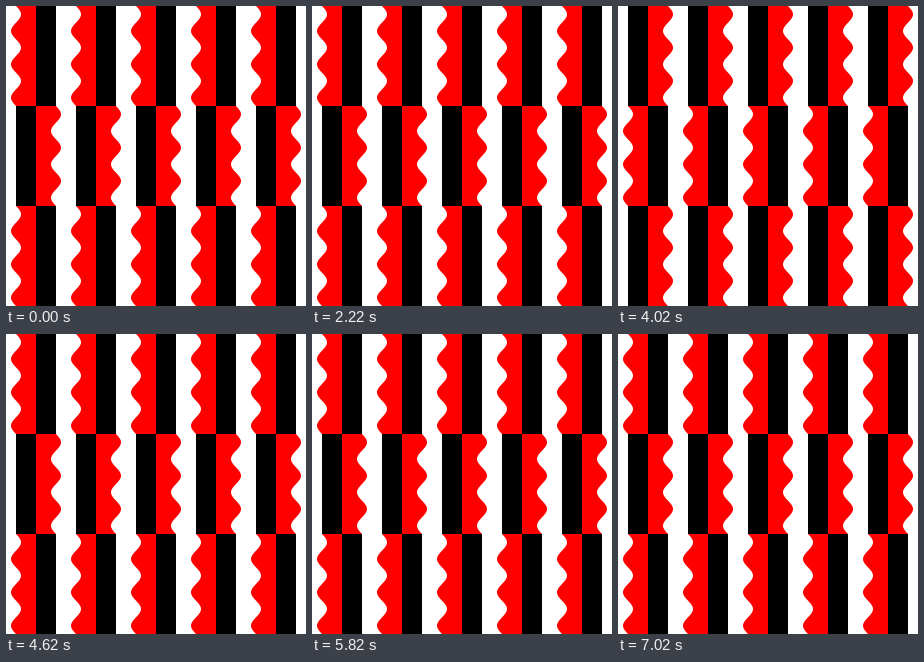
These frames come from a looping animation (300 px wide and 300 px high, 7.2 s). An HTML page:

```html
<!DOCTYPE html>
<html lang="en">
<head>
<meta charset="utf-8">
<title>Wavy bars</title>
<style>
  html, body { margin: 0; width: 100%; height: 100%; overflow: hidden; background: #fff; }
  svg { display: block; width: 300px; height: 300px; }
  #bars { transform-origin: 150px 150px; animation: turn 1200ms step-end -180ms infinite; }
  @keyframes turn {
    0% { transform: none; }
    50% { transform: rotate(180deg); }
  }
</style>
</head>
<body>
<svg viewBox="0 0 300 300">
  <defs>
    <g id="bar">
      <path id="wave" fill="#f00"/>
      <path d="M30 0H50V100H30Z"/>
    </g>
    <g id="row">
      <use href="#bar"/>
      <use href="#bar" x="60"/>
      <use href="#bar" x="120"/>
      <use href="#bar" x="180"/>
      <use href="#bar" x="240"/>
    </g>
  </defs>
  <g id="bars">
    <use href="#row"/>
    <use href="#row" transform="rotate(180 150 100)"/>
    <use href="#row" y="200"/>
  </g>
</svg>
<script>
  // Three sine periods down the left edge of the red bar
  let d = 'M30 0';
  for (let y = 0; y <= 100; y++) {
    d += `L${(10 + 5 * Math.sin(y / 100 * 6 * Math.PI)).toFixed(3)} ${y}`;
  }
  document.getElementById('wave').setAttribute('d', d + 'L30 100Z');
</script>
</body>
</html>
```
